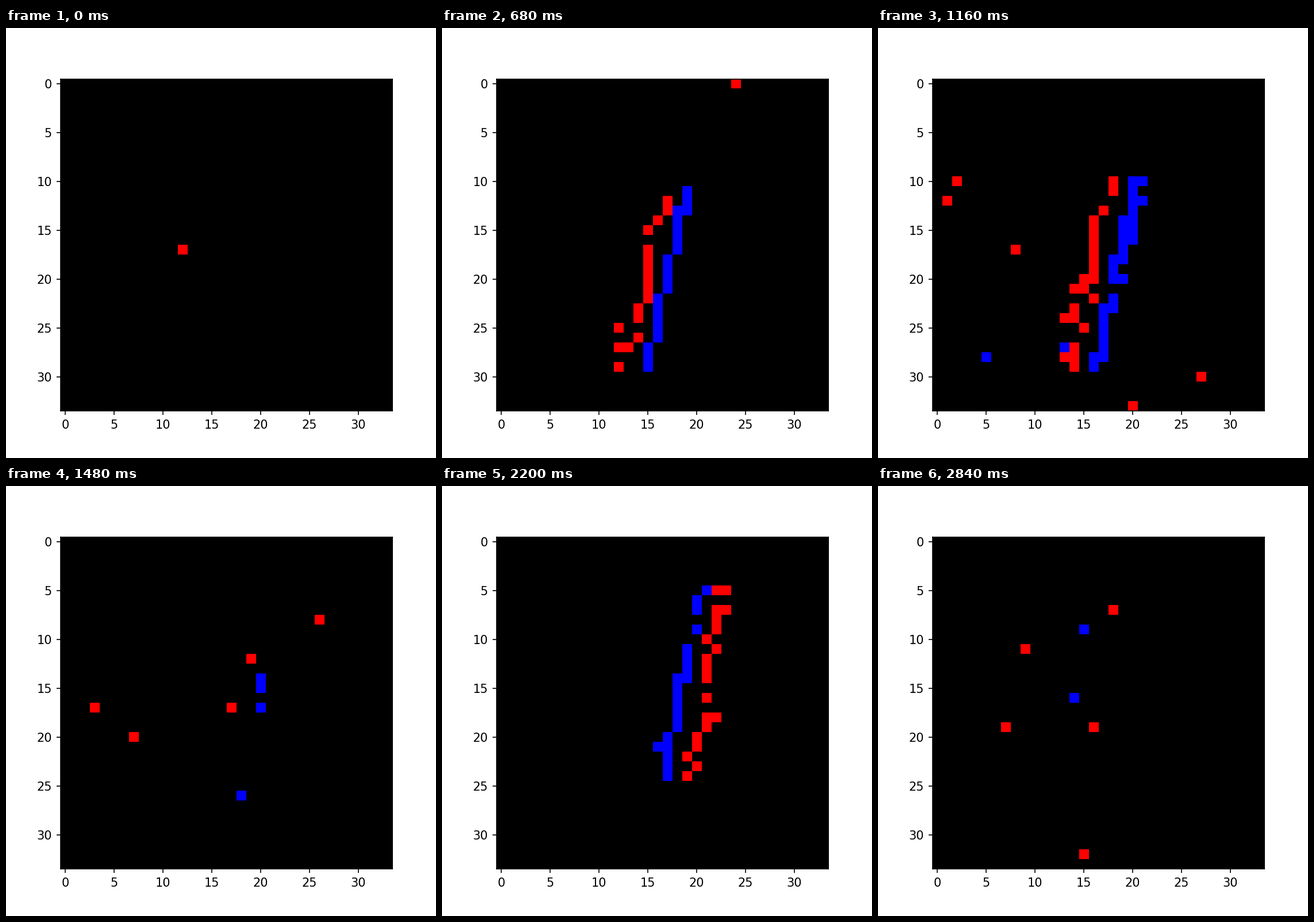
A matplotlib script for the animation above (2.88 s loop, 748 px wide and 748 px high).

```python
import numpy as np
import matplotlib.pyplot as plt
from matplotlib.animation import FuncAnimation

STAGE, DPI = 748, 150
SIZE = 34
FRAMES, STEP = 72, 40
RED, BLUE = (255, 0, 0), (0, 0, 255)

# Stroke centre: down, then up to the right, then back to the left
WAY_T = [0, 17, 24, 29, 37, 48, 55, 65, 71]
WAY_X = [15.1, 15.7, 16.1, 17.0, 18.4, 20.2, 19.8, 15.8, 15.1]
WAY_Y = [15.0, 20.0, 20.3, 19.3, 17.0, 14.5, 14.4, 15.0, 15.0]
TURN = 48
SLANT = 0.21
HALF = 9.3
GAP = 1.2


def centre(t):
    return np.interp(t, WAY_T, WAY_X), np.interp(t, WAY_T, WAY_Y)


def scene(t):
    """Events on both edges of a slanted moving stroke, plus stray noise."""
    rng = np.random.default_rng(400 + t)
    grid = np.zeros((SIZE, SIZE, 3), np.uint8)
    cx, cy = centre(t)
    rate = abs(np.sin(np.pi * t / 12))  # two bursts in each sweep
    speed = abs(cx - centre(t - 1)[0])
    lead = 1 if t <= TURN else -1

    for color, side, wobble in ((RED, -lead, 0.45), (BLUE, lead, 0.0)):
        for y in range(round(cy - HALF), round(cy + HALF) + 1):
            if rng.random() > 0.93 * rate:
                continue
            edge = cx - SLANT * (y - cy) + GAP * side
            x = round(edge + wobble * rng.normal())
            grid[y, x] = color
            if rng.random() < 1.7 * speed * rate:
                grid[y, x + side] = color

    for _ in range(rng.poisson(1.8)):
        x, y = rng.integers(0, SIZE, 2)
        grid[y, x] = RED if rng.random() < 0.75 else BLUE
    return grid


fig = plt.figure(figsize=(4.98667, 4.98667), dpi=DPI)
left, bottom, side = 94.625, 81.5, 577.5
ax = fig.add_axes([v / STAGE for v in (left, bottom, side, side)])
image = ax.imshow(scene(0), interpolation="nearest")
ax.set_xticks(range(0, 31, 5))
ax.set_yticks(range(0, 31, 5))


def update(t):
    image.set_data(scene(t))
    return [image]


anim = FuncAnimation(fig, update, frames=FRAMES, interval=STEP, repeat=True)
plt.show()
```
